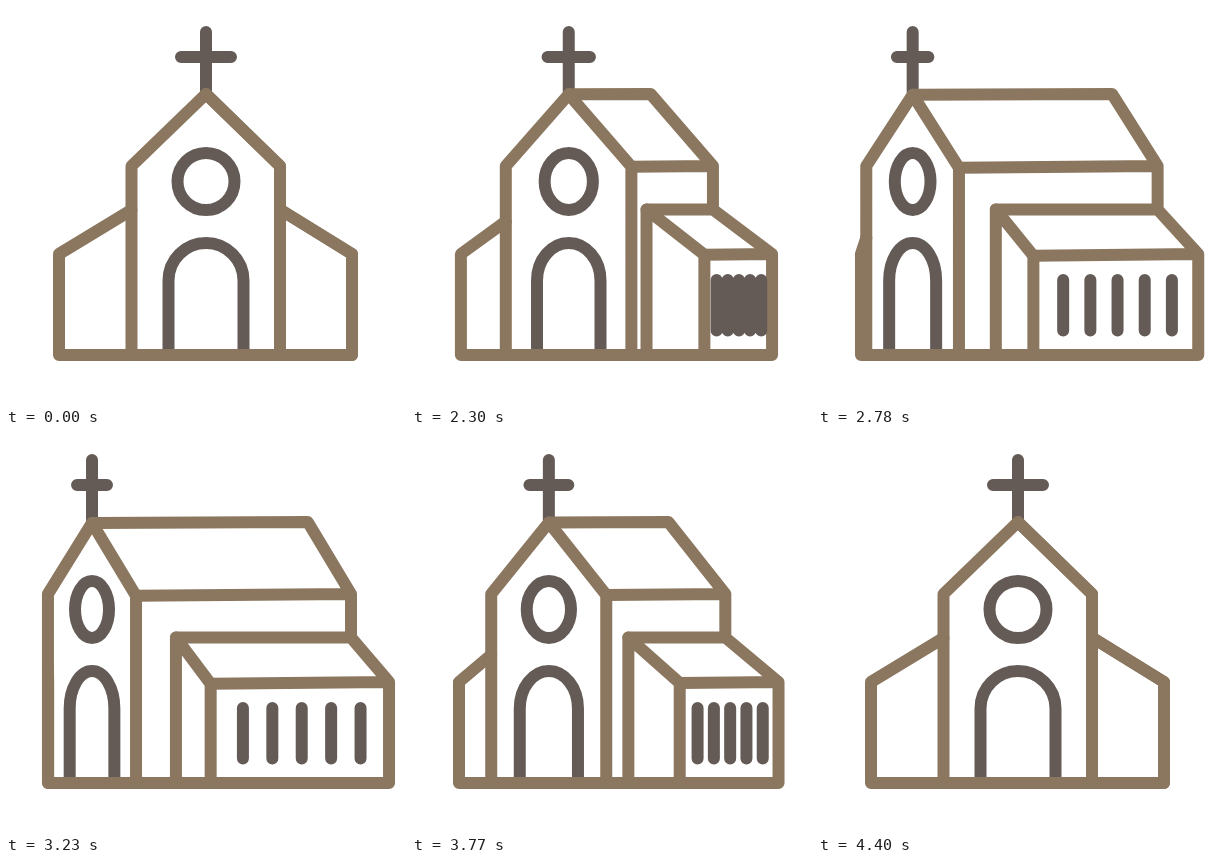
Animation of 400x400 px, one loop 4.43 s. Source, as an HTML page:

```html
<!DOCTYPE html>
<html lang="en">
<head>
<meta charset="utf-8">
<title>Turning chapel</title>
<style>
  html, body { margin: 0; width: 100%; height: 100%; overflow: hidden; background: #fff; }
  svg { display: block; width: 100vw; height: 100vh; }
  path { fill: none; stroke-width: 12; stroke-linecap: round; stroke-linejoin: round; }
  .dark { stroke: #645b57; }
  .wood { stroke: #8b775f; }
</style>
</head>
<body>
<svg viewBox="0 0 400 400">
  <path id="trim" class="dark"/>
  <path id="back" class="wood"/>
  <path id="windows" class="dark"/>
  <path id="front" class="wood"/>
</svg>
<script>
const LOOP = 4430, HOLD = 2030, STEP = 30;
const START = 2015, PEAK = 3215, END = 4400;
const TURN = 114; // how far the gable travels to the left

const part = id => document.getElementById(id);
const trim = part('trim'), back = part('back'), panes = part('windows'), front = part('front');

// Ease with flat ends; a and b are the handles along the time axis
function ease(x, a, b) {
  if (x <= 0) return 0;
  if (x >= 1) return 1;
  let lo = 0, hi = 1;
  for (let i = 0; i < 30; i++) {
    const s = (lo + hi) / 2, r = 1 - s;
    if (3 * r * r * s * a + 3 * r * s * s * b + s * s * s < x) lo = s; else hi = s;
  }
  return lo * lo * (3 - 2 * lo);
}

function turnAt(t) {
  if (t < HOLD) return 0;
  t = HOLD + Math.floor((t - HOLD) / STEP) * STEP;
  return t < PEAK
    ? TURN * ease((t - START) / (PEAK - START), 0.3, 0.12)
    : TURN * (1 - ease((t - PEAK) / (END - PEAK), 0.575, 0.4));
}

const line = (...pts) => 'M' + pts.map(p => p[0].toFixed(2) + ' ' + p[1].toFixed(2)).join('L');

function draw(t) {
  const p = turnAt(t);
  const apex = 200 - p;
  const wallL = 125.5 - 0.733 * p, wallR = 274 - 1.263 * p;
  const farTop = 200 + 0.893 * p, farWall = 274 + 0.623 * p;
  const aisleL = 53 - 0.095 * p;
  const aisleIn = 274 - 0.913 * p, aisleR = 346 - 1.24 * p, aisleFar = 346 + 0.325 * p;
  const tilt = 0.016 * p, floor = 349;

  const arm = 25 - 0.088 * p;
  const rx = 28.5 - 0.101 * p;
  const door = 37.5 - 0.133 * p;
  trim.setAttribute('d',
    line([apex, 26], [apex, 86]) +
    line([apex - arm, 51], [apex + arm, 51]) +
    `M${apex - rx} 175.5a${rx} 28.5 0 1 1 ${2 * rx} 0a${rx} 28.5 0 1 1 ${-2 * rx} 0Z` +
    `M${apex - door} 345V274.5a${door} 37.5 0 0 1 ${2 * door} 0V345`);

  const gable = [apex, 88 + tilt / 2], eave = [wallR, 160 + tilt];
  const ridge = [aisleIn, 203.5], corner = [aisleR, 248 + tilt];
  back.setAttribute('d',
    line([wallL, 204 + 0.265 * p], [aisleL, 248], [aisleL, floor], [aisleFar, floor], [aisleFar, 248]) +
    line(gable, [farTop, 88], [farWall, 160], [farWall, 203.5], [aisleFar, 248], corner) +
    line(eave, [farWall, 160]) +
    line(ridge, [farWall, 203.5]));

  let d = '';
  if (p > 0.5) {
    for (let i = 0; i < 5; i++) {
      const x = 346 + p * (0.258 * i - 0.957);
      d += line([x, 274], [x, 324.5]);
    }
  }
  panes.setAttribute('d', d);

  let f = line([wallL, floor], [wallL, 160], gable, eave, [wallR, floor]) +
    line(ridge, corner, [aisleR, floor]);
  if (p > 0.5) f += line(ridge, [aisleIn, floor]);
  front.setAttribute('d', f);
}

const begin = performance.now();
function tick() {
  draw((performance.now() - begin) % LOOP);
  requestAnimationFrame(tick);
}
tick();
</script>
</body>
</html>
```
